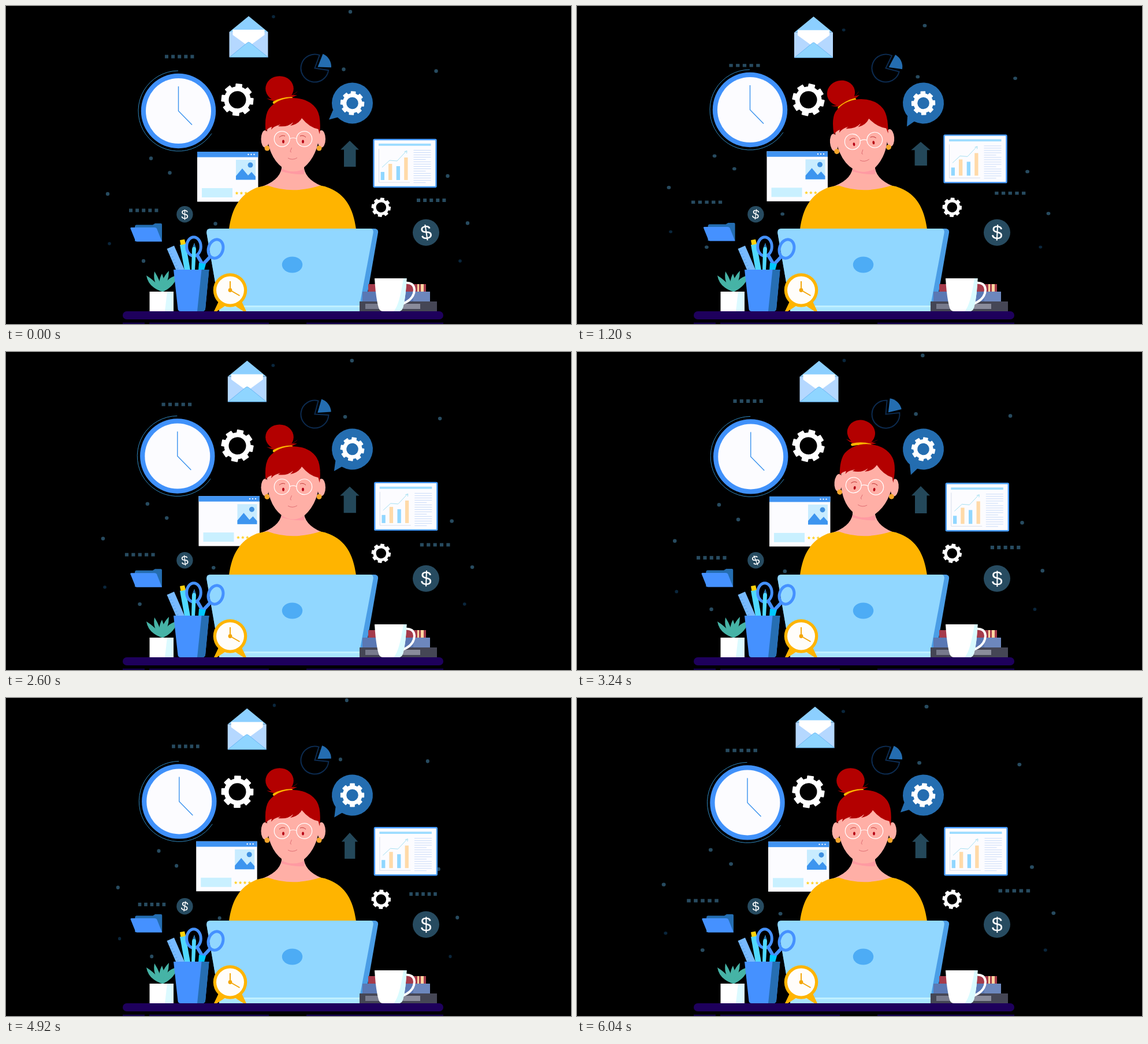
Write an HTML page that moves like this. It is 978 px wide and 550 px high and loops after 6.08 s.

```html
<!DOCTYPE html>
<html lang="en">
<head>
<meta charset="utf-8">
<title>Busy desk</title>
<style>
html, body { margin: 0; width: 100%; height: 100%; overflow: hidden; background: #000; }
svg { display: block; width: 100vw; height: 100vh; }
text { font-family: "Liberation Sans", Arial, sans-serif; fill: #fff; text-anchor: middle; }
</style>
</head>
<body>
<svg id="stage" viewBox="0 0 978 550"></svg>
<script>
const LOOP = 6080, STEP = 40;
const BLUE = '#4591ff', DEEP = '#246db0', SKY = '#91d7ff', SLATE = '#274b60';
const GOLD = '#ffb400', SKIN = '#ffafa6', RED = '#b30000', PAPER = '#fcfcff';

const rect = (x, y, w, h, fill, more = '') =>
  `<rect x="${x}" y="${y}" width="${w}" height="${h}" fill="${fill}" ${more}/>`;
const disc = (x, y, r, fill, more = '') => `<circle cx="${x}" cy="${y}" r="${r}" fill="${fill}" ${more}/>`;
const oval = (x, y, rx, ry, fill, more = '') =>
  `<ellipse cx="${x}" cy="${y}" rx="${rx}" ry="${ry}" fill="${fill}" ${more}/>`;
const shape = (d, fill, more = '') => `<path d="${d}" fill="${fill}" ${more}/>`;
const line = (d, color, width, more = '') =>
  `<path d="${d}" fill="none" stroke="${color}" stroke-width="${width}" ${more}/>`;
const group = (id, body) => `<g id="${id}">${body}</g>`;
const repeat = (n, make) => Array.from({ length: n }, (_, i) => make(i)).join('');

function gear(id, x, y, outer, body, hole) {
  const mid = (body + hole) / 2, tooth = outer * 0.42;
  const teeth = repeat(8, i =>
    rect(x - tooth / 2, y - outer, tooth, outer - mid, '#fff', `rx="1" transform="rotate(${i * 45} ${x} ${y})"`));
  return group(id, teeth + disc(x, y, mid, 'none', `stroke="#fff" stroke-width="${body - hole}"`));
}

const dash = (x, y) => repeat(5, i => rect(x + i * 11.1, y - 3, 6, 6, SLATE));

function confetti() {
  const bright = [[596, 10], [584.5, 109.5], [744.5, 112.5], [251, 263.5], [283.5, 288.5], [176, 325],
    [764.5, 294], [799, 375.5], [362.5, 376.5], [238, 441]];
  const dim = [[463, 18.5], [179, 411], [786, 441]];
  return bright.map(p => disc(...p, 3.2, SLATE)).join('') + dim.map(p => disc(...p, 2.8, '#0a263c')).join('') +
    dash(275, 87.5) + dash(213, 353.5) + dash(711, 336);
}

const envelope =
  shape('M386.5 45L420 17.5L453.5 45Z', '#8ccfff') + rect(386.5, 45, 67, 43.5, '#b5d8ff') +
  shape('M392.5 41H447.5V50L420 70L392.5 50Z', '#fff') +
  shape('M387 88.5L417 64Q420 61 423 64L453.5 88.5Z', '#8fd5ff', 'stroke="#58aaf0" stroke-width=".7"');

const clock =
  line('M298 112A69.5 69.5 0 1 0 356 220.5', '#2f87bd', 1) +
  disc(298.5, 181.5, 64.7, '#4091fa') + disc(298.5, 181.5, 56.5, PAPER) +
  line('M298.5 139V181.5L322 205.5', '#3a92ee', 1.4);

const browser =
  rect(331, 252, 105.5, 86.5, PAPER) + rect(331, 252, 105.5, 9.5, '#4194f2') +
  repeat(3, i => disc(419.5 + i * 5, 256.7, 1.2, '#fff')) +
  rect(398, 266, 34, 34.5, '#c8ecff') + disc(423, 275, 4.5, '#3d8fe0') +
  shape('M398 300.5V294L409 281L419 293L425 287L432 295V300.5Z', '#3d95ef') +
  rect(339, 315, 53, 16, '#c9f0ff') +
  repeat(5, i => shape(`M${399.5 + i * 7.9} 320.7l.9 1.8 2 .3-1.5 1.4.4 2-1.8-1-1.8 1 .4-2-1.5-1.4 2-.3z`, '#ffd22e'));

const bar = (x, y, fill) => rect(x, y, 6.3, 301 - y, fill);
const chart =
  rect(636.5, 231, 108, 82, PAPER, 'stroke="#459bff" stroke-width="2.4" rx="1.5"') +
  rect(645, 238, 90.5, 3.8, '#9ddcff') + line('M645.5 247V305H699', '#cfd6e6', .8) +
  bar(648.7, 287, SKY) + bar(662, 273, '#ffdaa8') + bar(675.7, 277, SKY) + bar(689.2, 262, '#ffdaa8') +
  line('M651 279L664 267L677 268L693 251M689.5 252L694 250.5L693.5 255', '#9bdcf0', .9) +
  repeat(15, i => rect(705.5, 249 + i * 4, 30 - (i % 5 == 4) * 9, 1, '#cbdcf8'));

const folder =
  shape('M223 407V382Q223 378.5 226 378.5H254L258 376H268Q270 376 270 378V407Z', DEEP) +
  shape('M217 383H257Q260 383 261 385L270 407.5H227Q225 407.5 224 406L215.5 385Q215 383 217 383Z', BLUE);

const pie =
  line('M534.5 107.5L558.2 111.2A24 24 0 1 1 542.7 85Z', '#0c2b50', 2) +
  shape('M539.5 105.5L548.5 82.8A24 24 0 0 1 563 106.2Z', DEEP);

const bubble =
  disc(599.5, 168, 35.5, DEEP) + shape('M566 180L559 196.5L580 191Z', DEEP);

const arrow = shape('M595 233L611 248.5H605.5V278H585V248.5H579Z', '#24485a');

const bun =
  oval(473.5, 143, 24.3, 21.8, RED) +
  shape('M451 160Q470 164 482 156Q496 156 505 147Q500 153 494 154L504 154Q490 162 466 165Q458 164 451 160Z', RED) +
  line('M464 167Q478 159.5 494 159.5', GOLD, 4.5, 'stroke-linecap="round"');

const head =
  oval(448.5, 230, 7, 15, SKIN) + oval(546, 230, 7, 15, SKIN) +
  disc(452, 246, 4.5, '#f5a62a') + disc(542, 246, 4.5, '#f5a62a') +
  shape('M451 200L453 232Q458 264 478 279Q497 291 516 279Q536 262 541 232L543 200Q520 170 496 170Q465 172 451 200Z', SKIN) +
  group('bun', bun) +
  shape('M449.5 217Q447 190 455 178Q470 159 497 159Q526 160 538 179Q546 192 543 222L540.5 213Q525 210 512 194' +
    'Q506 205 492 207Q496 204 497 201Q488 210 471 208L475 205Q463 208 459 214L460 209Q453 211 449.5 217Z', RED);

const face =
  oval(480, 234.5, 1.9, 3, '#b50014') + oval(514, 234.5, 1.9, 3, '#b50014') +
  line('M473 227Q478 222.5 483 225M509 225Q514 222.5 519 227', '#c23a3a', 1) +
  line('M494.5 245L492 251.5L494 253M488 263Q496 267.5 504 262.5', '#dc6a70', .9) +
  disc(477.7, 230, 13.4, 'none', 'stroke="#fff" stroke-width="1.2"') +
  disc(516.3, 230, 13.4, 'none', 'stroke="#fff" stroke-width="1.2"') +
  line('M491 229.5Q497 226.5 503 229.5', '#fff', 1.2);

const torso =
  shape('M477 265V281Q473 303 438 314Q470 326 497 325Q530 326 554 314Q520 303 516 281V265Z', SKIN) +
  shape('M477 281Q496 291 516 282V291Q496 292 477 286Z', '#ff9aa2') +
  shape('M386 386C391 349 405 326 434 314Q444 311 453 310.5Q496 326 544 310.5Q552 311 560 315C587 326 601 349 606 386Z', GOLD);

const laptop =
  shape('M354 385H637Q645 385 644 392L622 518H369L347.5 394Q346 385 354 385Z', '#4a9de6') +
  shape('M354 385H630Q637 385 635.5 393L612 518H369L347.5 394Q346 385 354 385Z', SKY) +
  oval(495.5, 447.5, 17.7, 14, '#4dacf5') + rect(369, 518, 253.5, 10, '#a9e5ff') + rect(369, 518, 253.5, 3, '#c0f0ff');

const leaf = (tip, bend) => shape(`M270 494Q${bend} ${tip}Q${(bend.split(' ')[0] * 1) + 16} 478 270 494Z`, '#46b3a6');
const plant =
  leaf('243 466', '246 486') + leaf('257 459', '253 480') + leaf('282 458', '266 474') +
  shape('M270 494Q275 470 296 466Q293 484 272 494Z', '#46b3a6') + leaf('270 463', '261 479') +
  rect(248.5, 494, 41.5, 34, '#fff') + shape('M279 494H290V528H275Z', '#dcfaff');

const penCup =
  shape('M278.5 420L291 414.5L309 456H294Z', '#78baff') +
  repeat(7, i => line(`M${281 + i * 2.3} ${425 + i * 5}l4 -1.7`, '#4c9bed', .8)) +
  shape('M301 413L311 411L319 457H309Z', '#50d8ff') + shape('M301 405L309 403.5L311 411.5L302.5 413.5Z', '#ffd20a') +
  line('M331 431L342 450M354 433L338 450', BLUE, 6) +
  oval(325, 416, 12.3, 16.3, 'none', `stroke="${BLUE}" stroke-width="5"`) +
  oval(363, 420, 12.5, 16.5, 'none', `stroke="${BLUE}" stroke-width="5" transform="rotate(18 363 420)"`) +
  shape('M334 444L346 446L343 457H333Z', '#00c8ff') +
  shape('M322 420L326 410L329 420L327 457H321Z', '#50d8ff') + shape('M323.5 417L326 410L328 417Z', DEEP) +
  shape('M290 456H351.5L345 524Q344 528 340 528H302Q298 528 297.5 524Z', BLUE) +
  shape('M338.5 456H351.5L345 524Q344 528 340 528H331Z', '#266eb3');

const alarm =
  shape('M369 509L360 528H365L382 517ZM407 509L416 528H411L394 517Z', GOLD) +
  disc(388, 491.5, 29.3, GOLD) + disc(388, 491.5, 24, '#fffdfa') + disc(388, 491.5, 3.4, '#f3a60a') +
  line('M388 476V491.5L404.5 501', '#f3a60a', 2);

const books =
  rect(627, 481, 100, 13, '#a53b4b') + rect(712, 481, 3, 13, '#ffd6a0') + rect(718, 481, 5, 13, '#ffd6a0') +
  rect(617, 494, 117, 17, '#5a78b4') + rect(705, 494, 29, 17, '#6d87bd') +
  rect(612, 511, 134, 17, '#454655') + rect(622, 515, 24, 9, '#777a8c') + rect(687, 515, 30, 9, '#8a8c9b');

const mug =
  line('M690 479Q706 477 707 491Q706 508 686 515', '#fff', 4) +
  shape('M638 471H693.5Q692 505 687 522Q685 528 679 528H653Q647 528 645 522Q640 505 638 471Z', '#fff') +
  shape('M693.5 471Q692 505 687 522Q685 528 679 528H671Q681 518 688 471Z', '#d9fbff');

const desk =
  rect(202, 528, 555, 14, '#1e005c', 'rx="7"') +
  rect(202, 547.5, 38, 2.5, '#12004a') + rect(248, 547.5, 207, 2.5, '#12004a') + rect(520, 547.5, 237, 2.5, '#12004a');

document.getElementById('stage').innerHTML =
  rect(0, 0, 978, 550, '#000') +
  group('confetti', confetti()) + group('envelope', envelope) + group('clock', clock) +
  gear('bigGear', 400.5, 162.2, 27.8, 23, 15) + group('pie', pie) + group('bubble', bubble) +
  gear('bubbleGear', 599.5, 168, 20.6, 17, 10.3) + group('arrow', arrow) + group('chart', chart) +
  group('browser', browser) + gear('smallGear', 649.3, 348.2, 16.6, 13.7, 8.8) + group('folder', folder) +
  disc(309.4, 360.3, 14.2, SLATE) + group('smallCoin', '<text x="309.4" y="367.8" font-size="22">$</text>') +
  disc(727, 391.7, 23, SLATE) + group('bigCoin', '<text x="727.3" y="403.2" font-size="34">$</text>') +
  torso + group('head', head) + group('face', face) + laptop + books + mug + plant + penCup + alarm + desk;

// Smooth curve through [time, value] keys
function curve(keys) {
  const slope = keys.map((k, i) => {
    const a = keys[Math.max(i - 1, 0)], b = keys[Math.min(i + 1, keys.length - 1)];
    return (b[1] - a[1]) / (b[0] - a[0]);
  });
  return t => {
    let i = 0;
    while (i < keys.length - 2 && t >= keys[i + 1][0]) i++;
    const [t0, a] = keys[i], [t1, b] = keys[i + 1], span = t1 - t0;
    const p = Math.min((t - t0) / span, 1), q = 1 - p;
    return a * q * q * (1 + 2 * p) + b * p * p * (3 - 2 * p) +
      span * p * q * (slope[i] * q - slope[i + 1] * p);
  };
}
const BEATS = [0, 1200, 1960, 3240, 3840, 4920, 6040];
const beats = (...values) => curve(BEATS.map((t, i) => [t, values[i]]));

const spreadX = curve([[0, 1], [640, 1.025], [1050, 1.06], [1200, 1.0546], [1320, 1.046], [1960, .968], [2560, 1.022],
  [2860, 1.047], [3240, 1.0217], [3450, 1.015], [3840, 1.048], [3960, 1.056], [4520, .977], [4920, .943],
  [5120, .965], [5760, 1.079], [6040, 1.083]]);
const spreadY = curve([[0, 1], [640, .978], [1200, .889], [1960, .958], [2560, .975], [3240, 1.0186], [3400, 1.022],
  [3840, 1], [4480, 1.036], [4920, 1.028], [5200, .975], [5550, .945], [6040, .977]]);
const arrowX = beats(1, 1.04, 1.07, 1, .97, .89, .93);
const arrowY = beats(1, .91, .955, 1.045, 1, 1, .955);

const drifts = {
  envelope: [beats(0, -10.5, -5.3, -1, -2.5, -2.8, -8), beats(0, .8, -1.7, -2.3, 0, .6, -2.4)],
  clock: [beats(0, 1, -5, 2.2, 0, 1.3, -3.5), beats(0, -2, -2.5, -.6, -2, -2.6, -.6)],
  browser: [beats(0, -2.5, 2, 2, .5, -1.8, 0), beats(0, -.7, -3.6, -2.1, -5, -4.2, -3.6)],
  chart: [beats(0, -1, 1, 2.3, 2.7, 1.4, 0), beats(0, -7.6, -6.8, -3.7, -4.8, -6.8, -6.8)],
  folder: [beats(0, 3.6, .2, .2, .2, .2, 1), beats(0, -1, -.7, -1, -.9, -2, -2)]
};
const spins = {
  bubble: [599.5, 168, beats(0, -19.7, -5, -29, -35, -15.7, -1.7)],
  pie: [535, 107.5, beats(0, 6, 7, -15, 5, -3, 0)],
  bigGear: [400.5, 162.2, beats(6, 13, 9, 14, 15, 1, 8)],
  bubbleGear: [599.5, 168, beats(5, -2, 6, 12, 10, 0, 6)],
  smallGear: [649.3, 348.2, beats(8, 3, 6, 10, 5, 2, 8)],
  smallCoin: [309.4, 360.3, beats(0, 8, 10, -22, -8, 10, -4)],
  bigCoin: [727, 391.7, beats(-9, 3, 3, 0, -5, 0, 0)]
};

// Head turns: start, end, change of tilt in degrees
const turns = [[600, 1300, -5], [2250, 2950, 10], [3480, 4200, -5]];

const place = (id, transform) => document.getElementById(id).setAttribute('transform', transform);
const scaleAt = (x, y, sx, sy) => `translate(${x} ${y}) scale(${sx} ${sy}) translate(${-x} ${-y})`;

function pose(t) {
  place('confetti', scaleAt(487.6, 225.5, spreadX(t), spreadY(t)));
  place('arrow', scaleAt(595, 255.5, arrowX(t), arrowY(t)));
  for (const id in drifts) place(id, `translate(${drifts[id][0](t)} ${drifts[id][1](t)})`);
  for (const id in spins) {
    const [x, y, angle] = spins[id];
    place(id, `rotate(${angle(t)} ${x} ${y})`);
  }
  let tilt = 0, dip = 0;
  for (const [from, to, by] of turns) {
    const p = Math.min(Math.max((t - from) / (to - from), 0), 1);
    tilt += by * p * p * (3 - 2 * p);
    dip += 4.2 * Math.sin(Math.PI * p);
  }
  place('head', `translate(0 ${dip}) rotate(${tilt} 497 275)`);
  place('bun', `translate(${tilt * .6} ${tilt * -.3}) rotate(${tilt * 2} 481 163)`);
  place('face', `translate(${tilt * .2} ${Math.abs(tilt) * .4 + dip * .75}) rotate(${tilt} 497 230)`);
}

const start = performance.now();
function tick() {
  const t = (performance.now() - start) % LOOP;
  pose(Math.floor(t / STEP) * STEP);
  requestAnimationFrame(tick);
}
tick();
</script>
</body>
</html>
```
